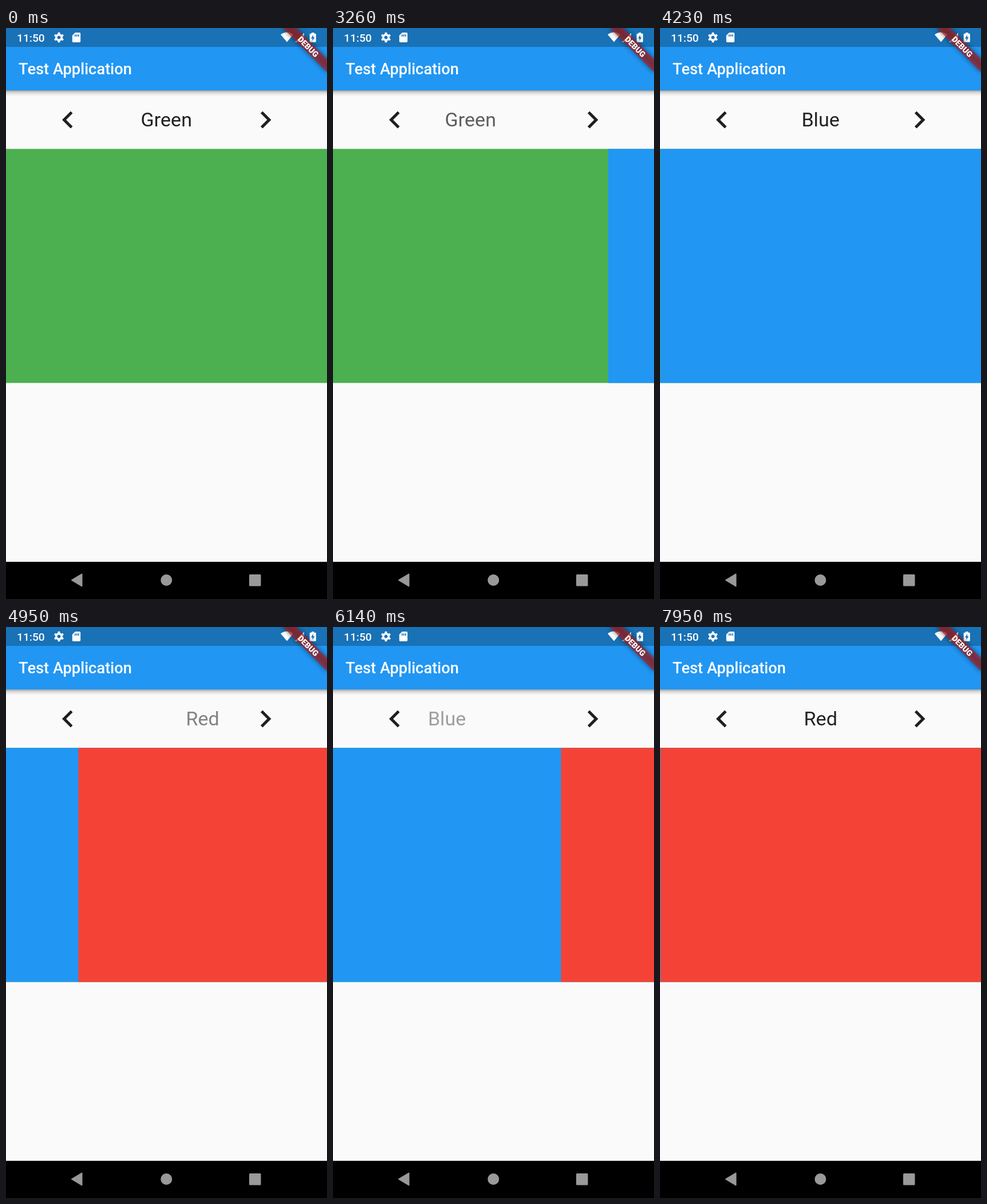
Write an HTML page that moves like this. It is 561 px wide and 998 px high and loops after 8 s.

```html
<!DOCTYPE html>
<html lang="en">
<head>
<meta charset="utf-8">
<title>Color pager</title>
<style>
html, body { margin: 0; width: 100%; height: 100%; overflow: hidden; background: #fafafa; }
svg { display: block; font-family: Roboto, sans-serif; }
</style>
</head>
<body>
<svg width="561" height="998" viewBox="0 0 561 998">
  <defs>
    <linearGradient id="shade" x1="0" y1="0" x2="0" y2="1">
      <stop offset="0" stop-color="#000" stop-opacity=".36"/>
      <stop offset=".4" stop-color="#000" stop-opacity=".13"/>
      <stop offset="1" stop-color="#000" stop-opacity="0"/>
    </linearGradient>
    <filter id="blur" x="-20%" y="-100%" width="140%" height="300%">
      <feGaussianBlur stdDeviation="4"/>
    </filter>
  </defs>
  <rect width="561" height="998" fill="#fafafa"/>

  <g id="pages"></g>
  <g id="labels" font-size="34.1" text-anchor="middle" fill="#000"></g>
  <g fill="#1f1f1f">
    <path transform="translate(78 130.5) scale(2.5)" d="M15.41 7.41L14 6l-6 6 6 6 1.41-1.41L10.83 12z"/>
    <path transform="translate(423.5 130.5) scale(2.5)" d="M10 6L8.59 7.41 13.17 12l-4.58 4.59L10 18l6-6z"/>
  </g>

  <rect y="109" width="561" height="10" fill="url(#shade)"/>
  <rect width="561" height="109" fill="#2196f3"/>
  <rect width="561" height="33" fill="#1971b6"/>
  <text x="22" y="81" font-size="27.27" font-weight="500" fill="#fff">Test Application</text>

  <g fill="#fff">
    <text x="19" y="24" font-size="19.2" font-weight="500">11:50</text>
    <g id="gear" transform="translate(92.5 16.5)">
      <circle r="4.7" fill="none" stroke="#fff" stroke-width="3.4"/>
    </g>
    <path fill-rule="evenodd" d="M121 8h7.500q1.700 0 1.700 1.700v13.600q0 1.700-1.700 1.700h-11q-1.700 0-1.700-1.700v-10.200zM120 11.300v3.700h1.700v-3.700zM123 11.300v3.700h1.700v-3.700zM126 11.300v3.700h1.700v-3.700z"/>
    <path d="M491 24.500L480 11.500q11-8 22 0z"/>
    <path d="M505 24.500h16v-16z"/>
    <path fill-rule="evenodd" d="M534 9.700v-1.700h4.500v1.700h2q1.300 0 1.300 1.300v12.500q0 1.300-1.300 1.300h-8.500q-1.300 0-1.300-1.300v-12.500q0-1.300 1.300-1.300zM537 12l-4 6.300h2.500v4.200l4-6.300h-2.500z"/>
  </g>

  <g transform="translate(561 0) rotate(45)">
    <rect x="-54.5" y="38.200" width="109" height="16.360" fill="#000" opacity=".5" filter="url(#blur)"/>
    <rect x="-54.5" y="38.200" width="109" height="16.360" fill="#b71c1c" fill-opacity=".627"/>
    <text y="51.300" font-size="13.900" font-weight="900" text-anchor="middle" fill="#fff">DEBUG</text>
  </g>

  <rect y="933" width="561" height="65" fill="#000"/>
  <g fill="#999">
    <path d="M115 965L132.500 954.500V975.500z" stroke="#999" stroke-width="2" stroke-linejoin="round"/>
    <circle cx="280.300" cy="965" r="10"/>
    <rect x="425" y="955" width="20.500" height="20.500" rx="1.500"/>
  </g>
</svg>
<script>
const NS = 'http://www.w3.org/2000/svg';
const W = 561, LOOP = 8000, STEP = 43.9;
const PAGES = [['Green', '#4caf50'], ['Blue', '#2196f3'], ['Red', '#f44336']];

function add(parent, tag, attrs) {
  const el = document.createElementNS(NS, tag);
  for (const k in attrs) el.setAttribute(k, attrs[k]);
  return document.getElementById(parent).appendChild(el);
}

for (let i = 0; i < 6; i++) {
  add('gear', 'path', { d: 'M-2.300 -5L-1.700 -8.700H1.700L2.300 -5z', transform: `rotate(${i * 60})` });
}

const blocks = PAGES.map(p => add('pages', 'rect', { y: 211.3, width: W * 3, height: 409.1, fill: p[1] }));
const labels = PAGES.map(p => {
  const el = add('labels', 'text', { y: 171.7 });
  el.textContent = p[0];
  return el;
});

// Overdamped page spring: distance left after t ms, starting at x px with speed v px/s
function spring(x, v, t) {
  const r1 = 9.08, r2 = 22.03;
  const a = (r2 * x - v) / (r2 - r1);
  t /= 1000;
  return a * Math.exp(-r1 * t) + (x - a) * Math.exp(-r2 * t);
}

// Finger drag followed by the spring; returns the share of a page travelled
function swipe(t, hold) {
  const left = t < hold ? W - 80 - 81 * t / hold : spring(400, 370, t - hold);
  return 1 - left / W;
}

function flingBack(t) {
  const start = 290, release = 702;
  if (t < start) return 0;
  const left = t < release
    ? W - 297 * ((t - start) / (release - start)) ** 3
    : Math.max(0.5, spring(264, 3023, t - release));
  return 1 - left / W;
}

// cubic-bezier(.25, .1, .25, 1)
function ease(x) {
  if (x <= 0) return 0;
  if (x >= 1) return 1;
  const bez = (a, b, u) => 3 * a * u * (1 - u) ** 2 + 3 * b * u * u * (1 - u) + u ** 3;
  let lo = 0, hi = 1;
  for (let i = 0; i < 24; i++) {
    const mid = (lo + hi) / 2;
    if (bez(0.25, 0.25, mid) < x) lo = mid; else hi = mid;
  }
  return bez(0.1, 1, lo);
}

// The screen refreshes in fixed steps counted from the start of each move
const stepped = t => Math.floor(t / STEP + 0.03) * STEP;

function position(t) {
  if (t < 3260) return 0;
  if (t < 4370) return swipe(stepped(t - 3260), 190);
  if (t < 4550) return 1;
  if (t < 5390) return 1 + swipe(stepped(t - 4550), 219);
  if (t < 7420) {
    const s = stepped(t - 5390);
    if (s < 260) return 1 + swipe(s + 840, 219);
    return 2 - flingBack(s);
  }
  const from = 1 + 0.5 / W;
  return from + (2 - from) * ease((stepped(t - 7420) - 40) / 515);
}

function draw(t) {
  const pos = position(t);
  PAGES.forEach((p, i) => {
    const d = i - pos;
    blocks[i].setAttribute('x', d * W);
    labels[i].setAttribute('x', 280.3 + d * W / 2);
    labels[i].setAttribute('opacity', 0.87 * Math.max(0, 1 - 2 * Math.abs(d)));
  });
}

const begin = performance.now();
function tick() {
  draw((performance.now() - begin) % LOOP);
  requestAnimationFrame(tick);
}
draw(0);
requestAnimationFrame(tick);
</script>
</body>
</html>
```
